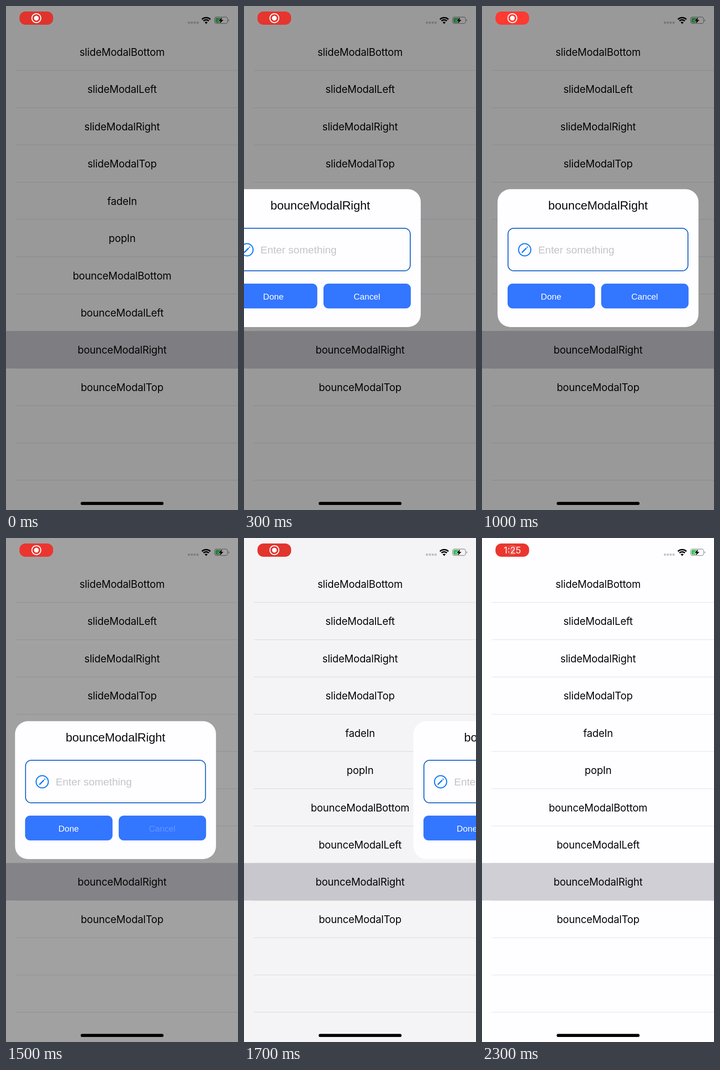
These frames come from a looping animation (508x1102 px, 2400 ms). An HTML page:

```html
<!DOCTYPE html>
<html lang="en">
<head>
<meta charset="utf-8">
<title>Modal bounce</title>
<style>
  html, body { margin: 0; width: 100%; height: 100%; overflow: hidden; background: #fefdff; }
  svg { display: block; width: 508px; height: 1102px; }
  text { text-anchor: middle; }
  #list text { font: 22.3px Inter, sans-serif; letter-spacing: -.2px; fill: #050507; }
  #modal text { font: 18.8px "Liberation Sans", Arial, sans-serif; fill: #fff; }
  #modal .title { font-size: 26.15px; fill: #0a0a0d; }
  #modal .hint { font-size: 22.9px; fill: #c4c3c8; text-anchor: start; }
  #clock { font: 500 19.5px Inter, sans-serif; fill: #fff; }
</style>
</head>
<body>
<svg viewBox="0 0 508 1102">
  <rect width="508" height="1102" fill="#fefdff"/>
  <g id="list"></g>

  <g fill="#c6c5c9">
    <rect x="398.3" y="34" width="4.6" height="4.8" rx="1.3"/>
    <rect x="404.6" y="34" width="4.6" height="4.8" rx="1.3"/>
    <rect x="410.9" y="34" width="4.6" height="4.8" rx="1.3"/>
    <rect x="417.2" y="34" width="4.6" height="4.8" rx="1.3"/>
  </g>
  <g fill="none" stroke="#000" stroke-width="3.1">
    <path d="M429.1 29.3A13.2 13.2 0 0 1 447.5 29.3M432.4 32.7A8.4 8.4 0 0 1 444.2 32.7"/>
    <path d="M438.3 39.2l-3.3-3.4a4.8 4.8 0 0 1 6.6 0z" fill="#000" stroke="none"/>
  </g>
  <rect x="456.8" y="24.3" width="28.4" height="14" rx="4" fill="none" stroke="#98979b" stroke-width="1.4"/>
  <path d="M487 29v4.8q1.8-.8 1.8-2.4t-1.8-2.4z" fill="#98979b"/>
  <rect x="458.6" y="26" width="13.5" height="10.6" rx="2.3" fill="#38c75c"/>
  <path d="M473.4 24.6l-8.2 7.8h4.6l-2 6 8.4-8h-4.7z" fill="#000" stroke="#fefdff" stroke-width="2" paint-order="stroke"/>

  <rect id="dim" width="508" height="1102"/>

  <g id="modal">
    <rect x="34" y="400.5" width="440" height="301.5" rx="28" fill="#fefdff"/>
    <text class="title" x="254" y="445.3">bounceModalRight</text>
    <rect x="57" y="486" width="394" height="93" rx="12.5" fill="none" stroke="#1462c6" stroke-width="2"/>
    <g fill="none" stroke="#0c7af3">
      <circle cx="93.5" cy="533" r="13.4" stroke-width="2.3"/>
      <path d="M87.3 539.2L97.3 529.2M98.4 528.1L100 526.5" stroke-width="2.7"/>
    </g>
    <text class="hint" x="123" y="541.2">Enter something</text>
    <g fill="#3376ff">
      <rect x="56" y="607" width="191.5" height="54.3" rx="11"/>
      <rect x="261" y="607" width="191.3" height="54.3" rx="11"/>
    </g>
    <text x="151.3" y="641.6">Done</text>
    <text id="cancel" x="356.2" y="641.6">Cancel</text>
  </g>

  <rect id="pill" x="29.5" y="12" width="73.7" height="29" rx="13"/>
  <g id="record">
    <circle cx="66.5" cy="26.5" r="9.8" fill="none" stroke="#fff" stroke-width="2"/>
    <circle cx="66.5" cy="26.5" r="5.2" fill="#fff"/>
  </g>
  <text id="clock" x="66.5" y="33.6">1:25</text>
  <rect x="163.5" y="1084.3" width="181.5" height="6.8" rx="3.4"/>
</svg>
<script>
const LOOP = 2400, STEP = 100, WIDTH = 508, ROW = 81.45, TOP = 59.5;
const $ = id => document.getElementById(id);
const ramp = (t, from, to) => Math.min(1, Math.max(0, (t - from) / (to - from)));

const labels = ['slideModalBottom', 'slideModalLeft', 'slideModalRight', 'slideModalTop', 'fadeIn',
  'popIn', 'bounceModalBottom', 'bounceModalLeft', 'bounceModalRight', 'bounceModalTop'];
const selected = labels.indexOf('bounceModalRight');
let rows = '';
for (let i = 0; i < 12; i++) {
  const y = TOP + ROW * i;
  rows += `<rect x="21" y="${y + ROW - .5}" width="487" height="1" fill="#dfdee2"/>`;
  if (labels[i]) rows += `<text x="254.2" y="${y + 49.3}">${labels[i]}</text>`;
}
$('list').innerHTML =
  `${rows}<rect y="${TOP + ROW * selected - .5}" width="508" height="82" fill="#d0cfd5"/>` +
  `<text x="254.2" y="${TOP + ROW * selected + 49.3}">${labels[selected]}</text>`;

// Underdamped spring from the right edge to rest
function enterOffset(t) {
  const s = Math.max(0, t - 95) / 1000, decay = 8.8, freq = 15.7;
  if (t >= 600) return 0;
  return WIDTH * Math.exp(-decay * s) * (Math.cos(freq * s) + decay / freq * Math.sin(freq * s));
}

// Pulls back to the left, then leaves to the right
const leaveOffset = p => WIDTH * p * p * (2.81 * p - 1.81);

function draw(t) {
  const leave = ramp(t, 1464, 1720);
  const x = enterOffset(t) + leaveOffset(leave);
  $('modal').setAttribute('transform', `translate(${x.toFixed(2)})`);
  $('dim').setAttribute('opacity', .395 * (1 - leave ** 1.3));
  $('cancel').setAttribute('opacity', 1 - .8 * ramp(t, 1290, 1420) + .8 * ramp(t, 1490, 1740));

  const glow = (1 - Math.cos(t / 1900 * 2 * Math.PI)) / 2;
  $('pill').setAttribute('fill', `rgb(${222 + 33 * glow},${52 + 6 * glow},${45 + 5 * glow})`);
  const swap = ramp(t, 2150, 2330);
  $('record').setAttribute('opacity', 1 - swap);
  $('clock').setAttribute('opacity', swap);
}

function tick(now) {
  draw(Math.floor(now % LOOP / STEP) * STEP);
  requestAnimationFrame(tick);
}
draw(0);
requestAnimationFrame(tick);
</script>
</body>
</html>
```
